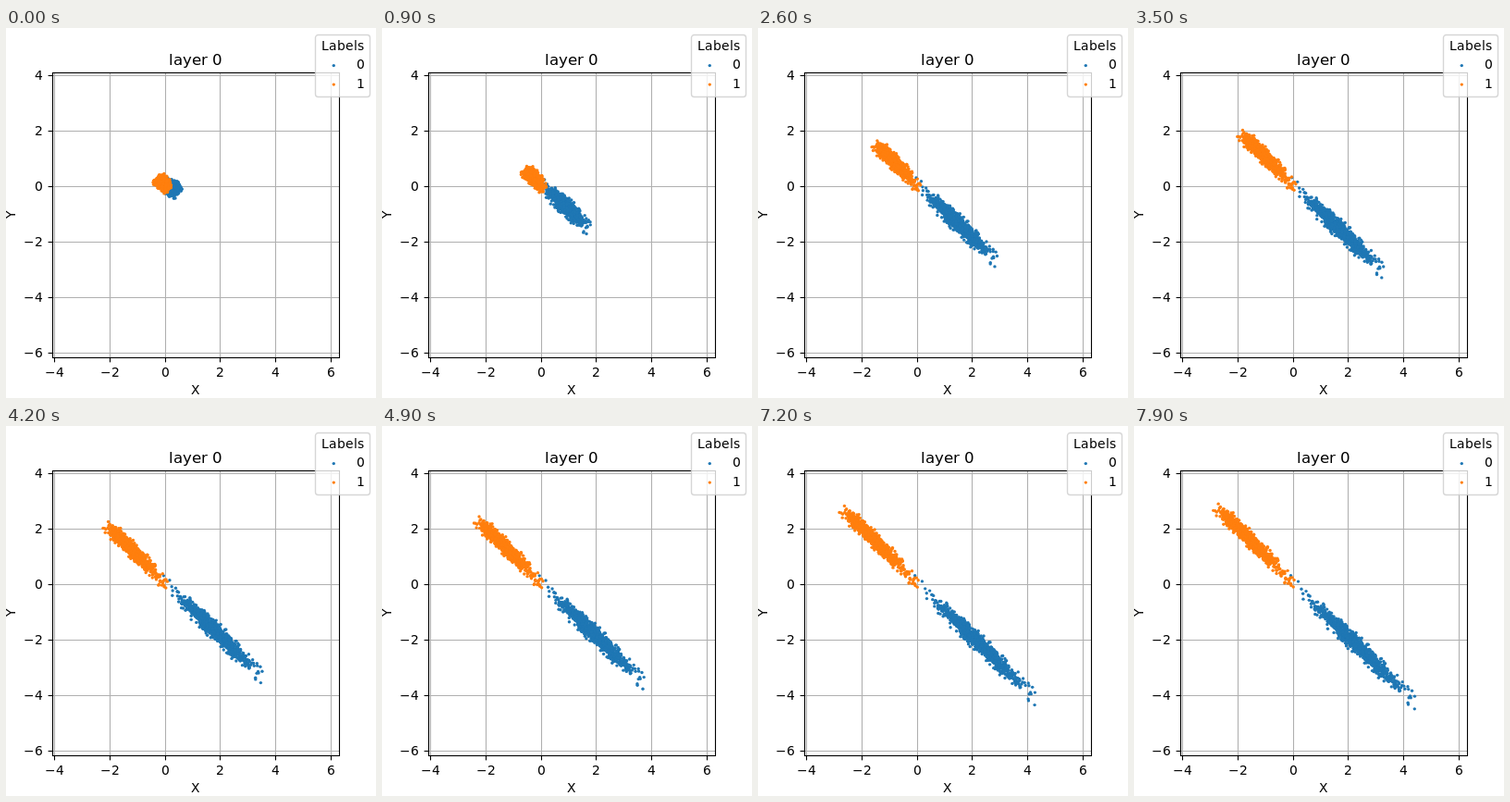
An HTML page with a canvas that plays this animation: 400 by 400 pixels, repeating every 8 s.

```html
<!DOCTYPE html>
<html>
<head>
<meta charset="utf-8">
<style>
  html, body { margin: 0; width: 400px; height: 400px; overflow: hidden; background: #fff; }
  canvas { display: block; }
</style>
</head>
<body>
<canvas id="plot" width="400" height="400"></canvas>
<script>
const ctx = document.getElementById('plot').getContext('2d');
const LOOP = 8000, STEP = 100, LAST = 7.9, LINE = 1.11, DOT = 1.7;
const BLUE = '#1f77b4', ORANGE = '#ff7f0e';

let seed = 7;
function random() {
  seed = (seed + 0x6D2B79F5) | 0;
  let r = Math.imul(seed ^ (seed >>> 15), 1 | seed);
  r = (r + Math.imul(r ^ (r >>> 7), 61 | r)) ^ r;
  return ((r ^ (r >>> 14)) >>> 0) / 4294967296;
}
const gauss = () => Math.sqrt(-2 * Math.log(1 - random())) * Math.cos(2 * Math.PI * random());

// Normal cloud, optionally skewed along its long axis
function cloud(count, skew, min, max) {
  const points = [];
  while (points.length < count) {
    const n = gauss(), u = n + skew * (n * n - 1), v = gauss();
    if (u > min && u < max && Math.abs(v) < 2.8) points.push([u, v]);
  }
  return points;
}

// Growth curves: blue spreads at once, orange gathers speed first
const logGrowth = t => Math.log(1 + t / 0.8);
const lateGrowth = t => t ** 1.7 / (t ** 1.7 + 7.5);

// from and to: centre x, centre y, spread along the diagonal
const groups = [
  { color: BLUE, growth: logGrowth, from: [179, 172.5, 2.8], to: [238.5, 234.5, 24.5],
    across: 3.5, points: cloud(850, 0, -3.1, 3.05) },
  { color: ORANGE, growth: lateGrowth, from: [169, 167, 2.8], to: [125, 122.5, 17.2],
    across: 3, points: cloud(850, 0.1, -2.15, 2.9) }
];

function line(x1, y1, x2, y2, color) {
  ctx.strokeStyle = color;
  ctx.beginPath();
  ctx.moveTo(x1, y1);
  ctx.lineTo(x2, y2);
  ctx.stroke();
}

// Sets glyphs on whole pixels; anchor 0 is left, 0.5 centre, 1 right
function text(str, x, y, anchor = 0.5, size = 13.89) {
  ctx.font = `${size}px "DejaVu Sans", sans-serif`;
  ctx.fillStyle = '#000';
  const widths = [...str].map(c => Math.round(ctx.measureText(c).width));
  let left = Math.round(x - anchor * widths.reduce((a, b) => a + b));
  [...str].forEach((c, i) => {
    ctx.fillText(c, left, y);
    left += widths[i];
  });
}

function dot(x, y, color) {
  ctx.fillStyle = color;
  ctx.beginPath();
  ctx.arc(x, y, DOT, 0, 2 * Math.PI);
  ctx.fill();
}

const label = n => String(n).replace('-', '\u2212');
const tickX = n => Math.floor(172 + n * 29.87) + 0.5;
const tickY = n => 171.5 - n * 30;

function drawGrid() {
  ctx.lineWidth = LINE;
  for (let n = -4; n <= 6; n += 2) {
    line(tickX(n), 48, tickX(n), 356, '#b0b0b0');
    line(50, tickY(n - 2), 360, tickY(n - 2), '#b0b0b0');
  }
}

function drawGroup({ color, growth, from, to, across, points }, t) {
  const k = growth(t) / growth(LAST);
  const [cx, cy, along] = from.map((a, i) => a + (to[i] - a) * k);
  for (const [u, v] of points) {
    const side = v * across * Math.SQRT1_2;
    dot(cx + u * along + side, cy + u * along * 0.985 - side, color);
  }
}

function drawFrame() {
  ctx.lineWidth = LINE;
  for (let n = -4; n <= 6; n += 2) {
    const x = tickX(n), y = tickY(n - 2);
    line(x, 356.5, x, 361.4, '#000');
    text(label(n), x - 0.2, 377);
    line(45.6, y, 50.5, y, '#000');
    text(label(n - 2), 40.3, Math.floor(y) + 5, 1);
  }
  ctx.strokeRect(50.5, 48.5, 310, 308);
  text('layer 0', 205, 40, 0.5, 16.67);
  text('X', 205, 396);
  ctx.save();
  ctx.translate(10, 202);
  ctx.rotate(-Math.PI / 2);
  text('Y', 0, 0);
  ctx.restore();
}

function drawLegend() {
  ctx.beginPath();
  ctx.roundRect(334.5, 7.5, 59, 67, 3);
  ctx.fillStyle = 'rgba(255,255,255,.8)';
  ctx.fill();
  ctx.strokeStyle = 'rgba(204,204,204,.8)';
  ctx.lineWidth = 1.39;
  ctx.stroke();
  text('Labels', 364, 24);
  dot(354.3, 40.6, BLUE);
  text('0', 379, 44, 0);
  dot(354.3, 61.1, ORANGE);
  text('1', 379, 65, 0);
}

function draw() {
  const t = Math.floor((performance.now() % LOOP) / STEP) * STEP / 1000;
  ctx.fillStyle = '#fff';
  ctx.fillRect(0, 0, 400, 400);
  drawGrid();
  groups.forEach(group => drawGroup(group, t));
  drawFrame();
  drawLegend();
  requestAnimationFrame(draw);
}
draw();
</script>
</body>
</html>
```
